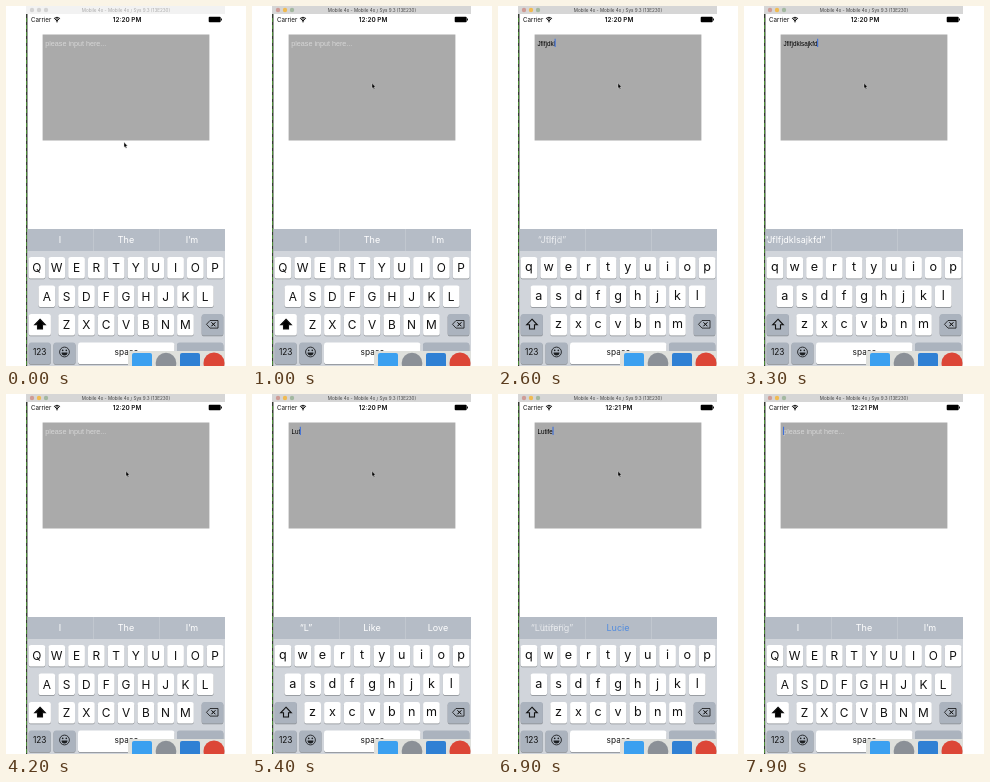
Recreate the animation shown at these times as an HTML page with a canvas. Size 240 by 360 pixels, loop 8000 ms.

```html
<!DOCTYPE html>
<html lang="en">
<head>
<meta charset="utf-8">
<title>Text view with placeholder</title>
<style>
html, body { margin: 0; width: 100%; height: 100%; overflow: hidden; background: #fff; }
canvas { display: block; width: 240px; height: 360px; }
</style>
</head>
<body>
<canvas id="stage"></canvas>
<script>
const LOOP = 8000, FADE = 150, STEP = 100;
const UI = 'Inter, Roboto, sans-serif', BODY = '"Liberation Sans", Arial, sans-serif';
const canvas = document.getElementById('stage');
const ctx = canvas.getContext('2d');
const dpr = window.devicePixelRatio || 1;
canvas.width = 240 * dpr;
canvas.height = 360 * dpr;

// Edits: [time, text after the edit]
const edits = [[-600, '']];
function type(word, times) {
  [...word].forEach((_, i) => edits.push([times(i), word.slice(0, i + 1)]));
}
function erase(word, start, step) {
  [...word].forEach((_, i) => edits.push([start + i * step, word.slice(0, -1 - i)]));
}
const first = 'Jflfjdklsajkfd', second = 'Lutifeng';
type(first, i => i ? 1850 + (i - 1) * 110 : 1500);
erase(first, 3350, 25);
type(second, i => i < 3 ? 4900 + i * 225 : 5350 + (i - 2) * 130);
erase(second, 6750, 95);

// Suggestions: [time, left, middle, right, middle is highlighted]
const hints = [
  [-999, 'I', 'The', 'I’m'],
  [1600, '“J”', 'I', 'Just', true],
  [2100, '“Jfl”', '', ''],
  [2500, '“Jflfjd”', '', ''],
  [2850, '“Jflfjdklsa”', '', ''],
  [3140, '“Jflfjdklsajkfd”', '', ''],
  [3750, 'I', 'The', 'I’m'],
  [5000, '“L”', 'Like', 'Love'],
  [5480, '“Lut”', 'Lit', 'Lot'],
  [5950, '“Lutife”', 'Life', 'Lute', true],
  [6120, '“Lutifeng”', 'Lucie', '', true],
  [6850, '“Lutif”', '', ''],
  [7150, '“Lut”', 'Lit', 'Lot'],
  [7450, 'I', 'The', 'I’m']
];
const lastIndex = (list, t) => list.findLastIndex(item => item[0] <= t);

function rect(x, y, w, h, color, r = 0) {
  ctx.fillStyle = color;
  ctx.beginPath();
  ctx.roundRect(x, y, w, h, r);
  ctx.fill();
}
function disc(x, y, r, color) {
  ctx.fillStyle = color;
  ctx.beginPath();
  ctx.arc(x, y, r, 0, 7);
  ctx.fill();
}
function text(str, x, y, size, color, align = 'center', family = UI, weight = 400) {
  ctx.font = `${weight} ${size}px ${family}`;
  ctx.textAlign = align;
  ctx.fillStyle = color;
  ctx.fillText(str, x, y);
}
function poly(points, fill, stroke, width = 0.8) {
  ctx.beginPath();
  points.forEach(([x, y]) => ctx.lineTo(x, y));
  ctx.closePath();
  if (fill) { ctx.fillStyle = fill; ctx.fill(); }
  if (stroke) { ctx.strokeStyle = stroke; ctx.lineWidth = width; ctx.stroke(); }
}
function arc(x, y, r, from, to, width, color = '#111') {
  ctx.strokeStyle = color;
  ctx.lineWidth = width;
  ctx.beginPath();
  ctx.arc(x, y, r, from, to);
  ctx.stroke();
}

function drawWindow(t) {
  const active = t >= 700;
  rect(20, 0, 199, 8, active ? '#d6d6d6' : '#f2f2f2');
  ['#cf9c96', '#f0bb52', '#a3b8a0'].forEach((c, i) => disc(26 + 7 * i, 4, 2.2, active ? c : '#d3d3d3'));
  text('Mobile 4x - Mobile 4x / Sys 9.3 (13E230)', 120, 5.7, 4.6, active ? '#444' : '#aaa');
  rect(20, 8, 1.5, 352, '#353b32');
  for (let y = 12; y < 360; y += 7) rect(20, y, 1, 4, '#4a8a35');
}

function drawStatus(t) {
  text('Carrier', 25, 15.6, 6.2, '#111', 'left');
  for (const r of [1.6, 3.1, 4.6]) arc(51, 16, r, -2.3, -0.84, 1);
  disc(51, 15.7, 0.7, '#111');
  text(t < 6900 ? '12:20 PM' : '12:21 PM', 121, 15.8, 6.4, '#111', 'center', UI, 600);
  rect(202.7, 10.7, 12, 5.6, '#000', 1);
  rect(215.1, 12.6, 0.9, 1.8, '#000');
}

function drawField(t, str, edited, marked) {
  rect(36.6, 28.6, 166.8, 105.8, '#aaa');
  ctx.font = `6.34px ${BODY}`;
  const end = 39.4 + ctx.measureText(str).width;
  if (marked && str) rect(38.5, 32.5, end - 38, 8.7, '#7795bb');
  if (str) text(str, 39.4, 39.6, 6.34, '#000', 'left', BODY);
  else text('please input here...', 39.2, 39.6, 7.2, '#d6d6d6', 'left', BODY);
  if ((t - edited) % 1000 < 500) rect(end - 0.4, 32.8, 1.1, 8.2, '#3d70dc');
}

function drawHint(hint, alpha) {
  ctx.globalAlpha = alpha;
  hint.slice(1, 4).forEach((word, i) => {
    ctx.save();
    ctx.beginPath();
    ctx.rect(21.5 + 66 * i, 223, 65, 22);
    ctx.clip();
    const x = word.length > 14 ? 51 : 54 + 66 * i;
    text(word, x, 236.6, 9, i === 1 && hint[4] ? '#1f74ea' : '#fff');
    ctx.restore();
  });
  ctx.globalAlpha = 1;
}

function drawHints(t, index) {
  const now = hints[index], old = hints[index - 1];
  const k = old ? Math.min(1, (t - now[0]) / FADE) : 1;
  rect(21.5, 223, 197.5, 22, '#b5bcc6');
  if (now[4]) rect(87, 223, 66.5, 22, '#eceff2');
  rect(87, 223, 0.6, 22, '#c9ced5');
  rect(153, 223, 0.6, 22, '#c9ced5');
  if (k < 1) drawHint(old, 1 - k);
  drawHint(now, k);
}

function key(x, y, w, color = '#fff') {
  rect(x, y + 0.7, w, 21.6, '#888c91', 2.6);
  rect(x, y, w, 21.6, color, 2.6);
}

function drawKeyboard(upper) {
  const dark = '#abb3be', ink = '#1c1f22';
  rect(21.5, 245, 197.5, 115, '#d1d5db');
  ['qwertyuiop', 'asdfghjkl', 'zxcvbnm'].forEach((row, r) => {
    const y = 251 + 28.5 * r, x0 = [30.9, 40.8, 60.6][r];
    [...row].forEach((c, i) => {
      const x = x0 + 19.8 * i;
      key(x - 8.3, y, 16.7);
      if (upper) text(c.toUpperCase(), x, y + 15.1, 11.9, '#111');
      else text(c, x, y + 14.1, 12.6, '#111');
    });
  });

  key(22.7, 308, 22.2, upper ? '#fff' : dark);
  const arrow = [[34, 313.2], [39.3, 318.8], [36.5, 318.8], [36.5, 323], [31.5, 323], [31.5, 318.8], [28.7, 318.8]];
  poly(arrow, upper ? '#000' : null, '#111', 1.1);

  key(195.7, 308, 21.6, dark);
  poly([[200.5, 318.3], [204, 314.5], [212, 314.5], [212, 322.1], [204, 322.1]], null, '#111');
  poly([[205.5, 316.4], [209.3, 320.2]], null, '#111');
  poly([[209.3, 316.4], [205.5, 320.2]], null, '#111');

  key(22.7, 336.5, 22, dark);
  text('123', 33.7, 349.3, 8.3, '#111');
  key(47.5, 336.5, 22, dark);
  arc(58.5, 346, 4.9, 0, 7, 0.9, ink);
  disc(56.7, 344.4, 0.8, ink);
  disc(60.3, 344.4, 0.8, ink);
  ctx.fillStyle = ink;
  ctx.beginPath();
  ctx.arc(58.5, 346.6, 3, 0, Math.PI);
  ctx.fill();
  key(72, 336.5, 96.5);
  text('space', 120.5, 348.7, 8.3, '#111');
  key(171, 336.5, 46.3, dark);
}

function drawDock() {
  rect(122, 345, 97, 15, '#dfe0dc');
  rect(126, 347, 20, 20, '#3ba0f0', 2);
  disc(160, 357, 10.3, '#8b9097');
  rect(174, 347, 20, 20, '#2f80d4', 2);
  disc(208, 357, 10.5, '#dc4637');
}

function drawPointer(t) {
  if (t >= 7000) return;
  const k = Math.min(1, Math.max(0, (t - 100) / 600));
  const e = k * k * (3 - 2 * k);
  const x = 118 + 2 * e, y = 136.3 - 59 * e;
  const shape = [[0, 0], [0, 5], [1.1, 4.1], [1.9, 5.9], [2.8, 5.5], [2, 3.8], [3.5, 3.7]];
  poly(shape.map(([a, b]) => [x + a, y + b]), '#000', '#ddd', 0.4);
}

function draw(t) {
  ctx.setTransform(dpr, 0, 0, dpr, 0, 0);
  rect(0, 0, 240, 360, '#fff');
  const [edited, str] = edits[lastIndex(edits, t)];
  const index = lastIndex(hints, t);
  drawWindow(t);
  drawStatus(t);
  drawField(t, str, edited, hints[index][4]);
  drawHints(t, index);
  drawKeyboard(!str);
  drawDock();
  drawPointer(t);
}

const start = performance.now();
function tick() {
  const t = (performance.now() - start) % LOOP;
  draw(Math.floor(t / STEP) * STEP);
  requestAnimationFrame(tick);
}
tick();
</script>
</body>
</html>
```
